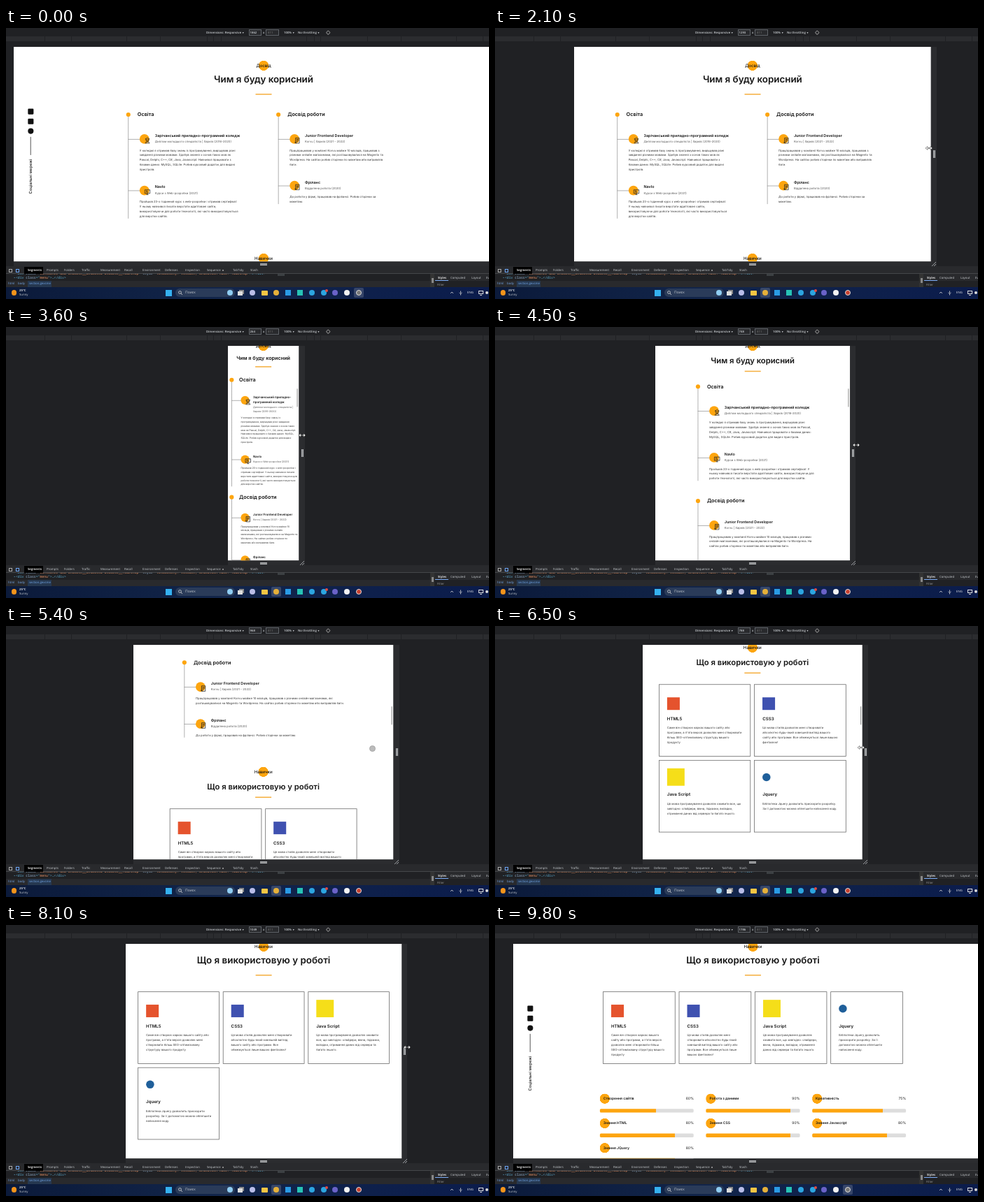
These frames come from a looping animation (690 by 388 pixels, 9900 ms). An HTML page:

```html
<!DOCTYPE html>
<html lang="uk">
<head>
<meta charset="utf-8">
<title>Responsive page</title>
<style>
html, body { margin: 0; width: 100%; height: 100%; overflow: hidden; background: #202124; }
* { box-sizing: border-box; }
#stage { position: absolute; left: 0; top: 0; width: 690px; height: 388px; overflow: hidden; background: #202124; text-rendering: geometricPrecision; font-family: Inter, sans-serif; }
.abs { position: absolute; }
.ui { position: absolute; white-space: pre; font: 600 4.3px/8px "Open Sans", sans-serif; color: #ccd0d4; }

/* emulated device, laid out in CSS pixels and scaled down */
#device { position: absolute; top: 27px; height: 800.5px; overflow: hidden; background: #fff; color: #151515; transform: scale(.3835); transform-origin: 0 0; container-type: inline-size; }
#page { position: relative; display: flow-root; --cw: 1140px; --top: 51px; --h: 34.9px; --lh: 52px; --m: 5px; --d: 29px; --gap: 59px; --end: 130px; --pad: 65px; --pr: 3px; --rows: 60px; --cols: 559px 1fr; --side: 11px; --card: 270px;
  --hx: 35px; --hb: 54px; --cx: 61px; --cr: 18px; --tx: 100px; --bx: 43px; --t: 14px/20px; --s: 11px/22px; --b: 10.9px/18px; --sg: 0px; --bg: 13px; --ib: 47px; --cy: 22px; --ws: pre; }
.box { width: var(--cw); margin: 0 auto; }
.tag { height: 38px; font: 500 16px/38px Inter, sans-serif; text-align: center; background: radial-gradient(circle, #fda50f 18px, #0000 19px); }
.tag.first { margin-top: var(--top); }
h2 { margin: var(--m) 0 var(--d); font: 600 var(--h)/var(--lh) Inter, sans-serif; text-align: center; }
hr { width: 60px; height: 4px; border: 0; background: #f5b041; margin: 0 auto var(--gap); }
.exp { display: grid; grid-template-columns: var(--cols); row-gap: var(--rows); align-items: start; padding: 0 var(--pr) var(--end) var(--pad); }
.col { background: linear-gradient(#999, #999) 0 15px / 2px 100% no-repeat; }
h3 { position: relative; margin: 0 0 var(--hb); padding-left: var(--hx); font: 600 19px/30px Inter, sans-serif; }
h3::before { content: ""; position: absolute; left: -7px; top: 7px; width: 16px; height: 16px; border-radius: 50%; background: #fda50f; }
.item { position: relative; margin-bottom: var(--ib); }
.item:last-child { margin: 0; }
.item::before { content: ""; position: absolute; top: var(--cy); width: var(--cx); height: 2px; background: #999; }
.item::after { content: ""; position: absolute; left: calc(var(--cx) - var(--cr)); top: calc(var(--cy) - var(--cr)); width: calc(2 * var(--cr)); height: calc(2 * var(--cr)); border-radius: 50%; background: #fda50f; }
.item svg { position: absolute; z-index: 1; left: calc(var(--cx) - 1px); top: calc(var(--cy) - 6px); width: 24px; height: 24px; fill: none; stroke: #222; stroke-width: 2; }
.item b { display: block; margin-left: var(--tx); font: 600 var(--t) Inter, sans-serif; }
.item i { display: block; margin: var(--sg) 0 var(--bg) var(--tx); font: 400 var(--s) Inter, sans-serif; color: #555; }
.item p { margin: 0 0 0 var(--bx); font: 400 var(--b) Inter, sans-serif; color: #333; white-space: var(--ws); }
.cards { display: grid; grid-template-columns: repeat(auto-fill, minmax(250px, 1fr)); gap: 13px; padding: 0 var(--side); }
.card { height: var(--card); border: 2px solid #666; padding: 29px 28px 0 29px; }
.mark { height: 65px; margin-bottom: 20px; display: flex; align-items: end; }
.card b { display: block; font: 600 16px/24px Inter, sans-serif; }
.card p { margin: 14px 0 0; font: 400 10.9px/18px Inter, sans-serif; color: #333; }
.bars { display: grid; grid-template-columns: repeat(auto-fill, minmax(300px, 1fr)); gap: 21px 46px; padding: 111px 0 60px; }
.bar div { height: 38px; display: flex; justify-content: space-between; padding-left: 13px; font: 400 13px/38px Inter, sans-serif; background: radial-gradient(circle at 18px 50%, #fda50f 18px, #0000 19px); }
.bar b { font-weight: 600; }
.bar s { display: block; height: 14px; margin-top: 19px; border-radius: 4px; }
#social { display: none; position: absolute; left: 51px; top: 231px; width: 24px; }
#social u { display: block; width: 21px; height: 21px; margin: 0 auto 15.5px; background: #111; border-radius: 3px; }
#social em { position: absolute; left: 11px; top: 105px; width: 2px; height: 68px; background: #222; }
#social span { position: absolute; left: 0; top: 184px; height: 134px; writing-mode: vertical-rl; transform: rotate(180deg); font: 500 15px/24px Inter, sans-serif; white-space: nowrap; }
#thumb { position: absolute; right: 4px; width: 3px; height: 68px; background: #999; display: none; }
@container (min-width: 1400px) { #social { display: block; } }
@container (max-width: 1199px) { #page { --cw: 960px; --cols: 470px 1fr; --ws: normal; } }
@container (max-width: 991px) { #page { --cw: 720px; --cols: 1fr; --pr: 40px; --top: -19px; --h: 29.4px; --lh: 42px; --m: 17px; --d: 15px; --gap: 40px; --end: 109px; } #thumb { display: block; } }
@container (max-width: 767px) { #page { --cw: 540px; } }
@container (max-width: 575px) { #page { --cw: 100%; --h: 22.4px; --gap: 21px; --pad: 13px; --pr: 3px; --rows: 25px; --side: 25px; --card: 261px; } }
@container (max-width: 299px) { #page { --h: 18.9px; --lh: 30px; --m: 12px; --gap: 32px; --hx: 29px; --hb: 42px; --cx: 51px; --cr: 16px; --tx: 81px; --bx: 35px; --t: 11.4px/17px; --s: 9.2px/16px; --b: 8.8px/15px; --sg: 3px; --bg: 9px; --ib: 38px; --cy: 19px; } }
</style>
</head>
<body>
<div id="stage">
  <div id="rail" class="abs" style="top:27px;height:314px;background:#2b2c2f"></div>
  <div id="device">
    <div id="page"></div>
    <div id="social"><u></u><u></u><u style="border-radius:50%"></u><em></em><span>Соціальні мережі</span></div>
    <div id="thumb"></div>
  </div>
  <div id="grip" class="abs" style="top:175px;width:3px;height:11px;background:#777;border:solid #b8bbbf;border-width:0 1px"></div>
  <svg id="corner" class="abs" style="top:335px" width="6" height="6" stroke="#b8bbbf" stroke-width=".8"><path d="M0 6 6 0M3 6 6 3"/></svg>
  <div id="shell"></div>
  <svg id="arrows" class="abs" width="10" height="6" viewBox="0 0 10 6"><path d="M0 3 3 .6V2.4H7V.6L10 3 7 5.4V3.6H3V5.4Z" fill="#fff" stroke="#222" stroke-width=".5"/></svg>
  <div id="touch" class="abs" style="left:518.5px;top:170.5px;width:9px;height:9px;border-radius:50%;background:#bbb;border:.5px solid #aaa"></div>
</div>
<script>
const $ = id => document.getElementById(id);
const SCALE = .3835, MID = 368, LOOP = 9900, ORANGE = '#fda50f';

// Page content
const icons = {
  grad: 'M4 6 12 2 20 6 12 10ZM7 9V13Q12 17 17 13V9M4 22Q5 16 12 16T20 22Z',
  screen: 'M2 4H22V17H2ZM8 22H16M12 17V22M6 8H12M6 12H16',
  paper: 'M5 2H19V22H5ZM8 7H16M8 11H16M8 15H13M1 19H9'
};
const head = (tag, title, cls) => `<div class="tag ${cls}">${tag}</div><h2>${title}</h2><hr>`;
const item = (icon, name, sub, text) =>
  `<div class="item"><svg viewBox="0 0 24 24"><path d="${icons[icon]}"/></svg><b>${name}</b><i>${sub}</i><p>${text}</p></div>`;
const col = (title, ...items) => `<div class="col"><h3>${title}</h3>${items.join('')}</div>`;
const card = (size, color, style, name, text) =>
  `<div class="card"><div class="mark"><div style="width:${size}px;height:${size}px;background:${color};${style}"></div></div><b>${name}</b><p>${text}</p></div>`;
const bar = ([name, n]) =>
  `<div class="bar"><div><b>${name}</b>${n}%</div><s style="background:linear-gradient(90deg,${ORANGE} ${n}%,#ddd 0)"></s></div>`;

$('page').innerHTML = head('Досвід', 'Чим я буду корисний', 'first') +
  '<div class="box exp">' +
  col('Освіта',
    item('grad', 'Зарічанський приладно-програмний коледж', 'Диплом молодшого спеціаліста | Харків (2016-2020)',
`У коледжі я отримав базу знань із програмування, вирішував різні
завдання різними мовами. Здобув знання з основ таких мов як
Pascal, Delphi, C++, C#, Java, Javascript. Навчився працювати з
базами даних: MySQL, SQLite. Робив курсовий додаток для видачі
пристроїв.`),
    item('screen', 'Navlo', 'Курси з Web-розробки (2021)',
`Пройшов 23-х годинний курс з web-розробки і отримав сертифікат.
У ньому навчився писати верстати адаптовані сайти,
використовуючи для роботи технології, які часто використовуються
для верстки сайтів.`)) +
  col('Досвід роботи',
    item('paper', 'Junior Frontend Developer', 'Korvu | Харків (2021 - 2022)',
`Працпрацював у компанії Korvu майже 10 місяців, працював з
різними онлайн магазинами, які розташовувалися на Magento та
Wordpress. На сайтах робив сторінки по макетам або виправляв
баги.`),
    item('paper', 'Фріланс', 'Віддалена робота (2020)',
`До роботи у фірмі, працював на фрілансі. Робив сторінки за
макетам.`)) +
  '</div>' + head('Навички', 'Що я використовую у роботі', 'skills') +
  '<div class="box"><div class="cards">' +
  card(47, '#e5532d', '', 'HTML5', "Саме він створює каркас вашого сайту або програми, а п'ята версія дозволяє мені створювати більш <nobr>SEO-оптимізовану</nobr> структуру вашого продукту") +
  card(47, '#3f51b0', '', 'CSS3', 'Ця мова стилів дозволяє мені створювати абсолютно <nobr>будь-який</nobr> зовнішній вигляд вашого сайту або програми. Все обмежується лише вашою фантазією!') +
  card(65, '#f5de19', '', 'Java Script', 'Ця мова програмування дозволяє оживити все, що завгодно: слайдери, вікна, підказки, вкладки, отримання даних від сервера та багато іншого.') +
  card(30, '#1f5f9a', 'border-radius:50%;align-self:center', 'Jquery', 'Бібліотека Jquery дозволить прискорити розробку. За її допомогою можна облегшити написання коду.') +
  '</div><div class="bars">' +
  [['Створення сайтів', 60], ['Робота з даними', 90], ['Креативність', 75], ['Знання HTML', 80],
   ['Знання CSS', 90], ['Знання Javascript', 80], ['Знання JQuery', 80]].map(bar).join('') + '</div></div>';

// Browser tools and taskbar
const rect = (x, y, w, h, bg, style = '', inner = '') =>
  `<div class="abs" style="left:${x}px;top:${y}px;width:${w}px;height:${h}px;background:${bg};${style}">${inner}</div>`;
const disc = (x, y, r, bg) => rect(x - r, y - r, 2 * r, 2 * r, bg, 'border-radius:50%');
const label = (x, y, text, style = '') => `<div class="ui" style="left:${x}px;top:${y - 4}px;${style}">${text}</div>`;
const down = '<span style="font-size:3.5px"> ▼</span>';
const tabs = [[31, 'Segments'], [58, 'Prompts'], [83, 'Folders'], [108, 'Traffic'], [135, 'Measurement'], [169, 'Recall'],
  [195, 'Environment'], [227, 'Defenses'], [256, 'Inspection'], [287, 'Sequence'], [324, 'TabTidy'], [349, 'Stash']];
const side = [[617, 'Styles'], [635, 'Computed'], [665, 'Layout'], [686, 'Event']];
const code = 'color:#5db0d7;font:4.8px/8px "Noto Sans Mono",monospace'.replaceAll('"', "'");
const attr = (k, v) => ` <span style="color:#9bbbdc">${k}</span>="<span style="color:#f29766">${v}</span>"`;

$('shell').innerHTML =
  label(286, 6.5, 'Dimensions: Responsive' + down) +
  rect(346.5, 2, 18.5, 9, '#292a2d', 'border:.6px solid #5f6368') + '<div id="size" class="ui" style="left:348.5px;top:2.5px"></div>' +
  label(367, 6.5, 'x') + rect(371, 2, 19, 9, '#292a2d', 'border:.6px solid #5f6368') + label(374, 6.5, '811', 'color:#666') +
  label(397, 6.5, '100%' + down) + label(417, 6.5, 'No throttling' + down) +
  rect(458, 4, 4.5, 4.5, 'none', 'border:.7px solid #888;border-radius:1px;transform:rotate(45deg)') +
  rect(0, 11.5, 690, 7, '#2b2c2f') +
  [61, 72, 81, 148, 196, 275, 313].flatMap(d => [MID - d, MID + d]).map(x => rect(x, 11.5, 1, 7, '#202124')).join('') +
  rect(363, 336.5, 10, 3, '#777', 'border:solid #b8bbbf;border-width:1px 0') +
  rect(0, 341, 690, 30, '#202124') + rect(0, 341, 690, 11, '#292a2d', 'border-bottom:.6px solid #45474a') +
  rect(4, 345, 4.5, 4.5, 'none', 'border:.7px solid #aaa') + rect(14, 344.5, 5, 5.5, 'none', 'border:.8px solid #6ca5f5') +
  rect(26, 342, 27, 10, '#000') +
  tabs.map(([x, s], i) => label(x, 347, s, i ? 'font-weight:400' : 'color:#fff')).join('') + disc(310, 347, 1.3, '#aaa') +
  rect(0, 352, 606, 3.5, 'none', 'overflow:hidden',
    label(11, 0, `▸&lt;div${attr('class', 'container wow animate__animated animate__fadeInUp')}${attr('style', 'visibility: visible; animation-name: fadeInUp')}&gt;…&lt;/div&gt;`, code)) +
  rect(388, 351.5, 10, 3, '#3c4043') +
  label(11, 358, `▸&lt;div${attr('class', 'menu')}&gt;…&lt;/div&gt;`, code) +
  rect(0, 361.5, 606, 9.5, '#292a2d') + rect(31, 361.5, 34, 9, '#263850') +
  [[3, 'html'], [17, 'body'], [33, 'section.gexsme']].map(([x, s]) => label(x, 365.5, s, 'color:#74a9ec;font-weight:400')).join('') +
  rect(606, 352, 6, 19, '#333') + rect(607.5, 358, 3, 7, '#888') +
  rect(612, 352, 78, 10, '#292a2d') + rect(613, 361, 19, 1, '#7cacf8') +
  side.map(([x, s], i) => label(x, 357.5, s, i ? 'font-weight:400' : 'color:#fff')).join('') +
  label(616, 368, 'Filter', 'font-weight:400;color:#999') +
  rect(0, 371, 690, 17, 'linear-gradient(90deg,#0b1a3a,#12254a 45%,#0b1c4c)') +
  disc(11.5, 379, 3.8, '#f5941b') + label(19, 376, '25°C', 'color:#fff') + label(19, 382, 'Sunny', 'font-weight:400') +
  rect(228, 374.5, 9, 9, '#35b1f0') +
  rect(242, 373, 85, 12, '#2a3b59', 'border-radius:6px') +
  '<svg class="abs" style="left:246px;top:376px" width="6" height="6" fill="none" stroke="#ddd" stroke-width=".8"><circle cx="2.5" cy="2.5" r="1.9"/><path d="M4 4 6 6"/></svg>' +
  label(256, 379, 'Поиск', 'font-size:5px;font-weight:400') + disc(320, 379, 4, '#8fcdf2') +
  '<div id="tile" class="abs" style="top:372px;width:14px;height:14px;border-radius:2px;background:#ffffff2b"></div>' +
  rect(333, 375, 7, 6, '#888') + rect(331, 377, 7, 6, '#ddd') + disc(352, 379, 4, '#b9bde8') +
  rect(364.5, 375.5, 9, 7, '#f6c544', 'border-radius:1px') + disc(386, 379, 4.3, '#e5b03a') +
  rect(399, 375, 8, 8, '#2a9be5') + rect(416, 375, 8, 8, '#27c3b5') +
  disc(437, 379, 4.3, '#2ca5e0') + disc(454, 379, 4.3, '#2ca5e0') + disc(457.5, 376, 2, '#e04a3f') +
  disc(470, 379, 4.2, '#6a62c8') + disc(487, 379, 4.3, '#f2f2f2') +
  '<div id="rec" class="abs" style="left:500px;top:375px;width:8px;height:8px;border-radius:50%;border:1px solid #ddd"></div>' +
  '<svg class="abs" style="left:634px;top:376px" width="20" height="7" fill="none" stroke="#ddd" stroke-width=".8"><path d="M1 4 3 2 5 4M15.5 .5V3.5M13.5 3Q15.5 6 17.5 3M15.5 4.5V6.5"/></svg>' +
  label(659, 379, 'ENG', 'font-weight:400;color:#eee') +
  rect(675, 376, 6.5, 5, 'none', 'border:.7px solid #ddd') + rect(677, 382, 3, .8, '#ddd') + disc(687, 379, 2, '#ddd');

// Motion
const track = (keys, t) => {
  const i = keys.findIndex(k => k[0] > t);
  if (i === 0) return keys[0][1];
  if (i < 0) return keys.at(-1)[1];
  const [a, x] = keys[i - 1], [b, y] = keys[i];
  return x + (y - x) * (t - a) / (b - a);
};
const widths = [[1300, 1862], [2100, 1330], [2140, 1294], [3300, 339], [3580, 264], [3700, 264], [4700, 840], [4880, 968],
  [6300, 968], [7180, 310], [7350, 310], [8100, 1027], [8140, 1048], [8300, 1257], [9300, 1786]];
const pointerY = [[2100, 172], [3600, 155], [4900, 175], [6300, 175], [7200, 171], [8100, 175]];
const LEAD = 40; // the pointer and the size field run ahead of the layout
const skills = document.querySelector('.skills');

function draw(now) {
  const t = now % LOOP;
  const w = track(widths, t), ahead = track(widths, t + LEAD);
  const right = MID + w * SCALE / 2, left = 2 * MID - right;
  $('device').style.width = w + 'px';
  $('device').style.left = left + 'px';
  $('rail').style.left = left + 'px';
  $('rail').style.width = w * SCALE + 8 + 'px';
  $('grip').style.left = right + 3 + 'px';
  $('corner').style.left = right + 1.5 + 'px';
  $('size').textContent = Math.round(ahead);

  const natural = skills.offsetTop + 19;
  const y = track([[5000, natural], [5400, 475], [5900, 10]], t);
  $('page').style.transform = `translateY(${y - natural}px)`;
  $('thumb').style.top = track([[5000, 160], [5400, 230]], t) + 'px';

  const touching = t >= 5000 && t < 6100;
  $('touch').style.display = touching ? '' : 'none';
  $('arrows').style.display = touching ? 'none' : '';
  $('arrows').style.left = MID + ahead * SCALE / 2 - 1 + 'px';
  $('arrows').style.top = track(pointerY, t) - 3 + 'px';

  const idle = t < 100 || t >= 9800;
  $('tile').style.left = (idle ? 497 : 379) + 'px';
  $('rec').style.background = t < 400 || t >= 9800 ? '#777' : '#c8402f';
  requestAnimationFrame(draw);
}
requestAnimationFrame(draw);
</script>
</body>
</html>
```
